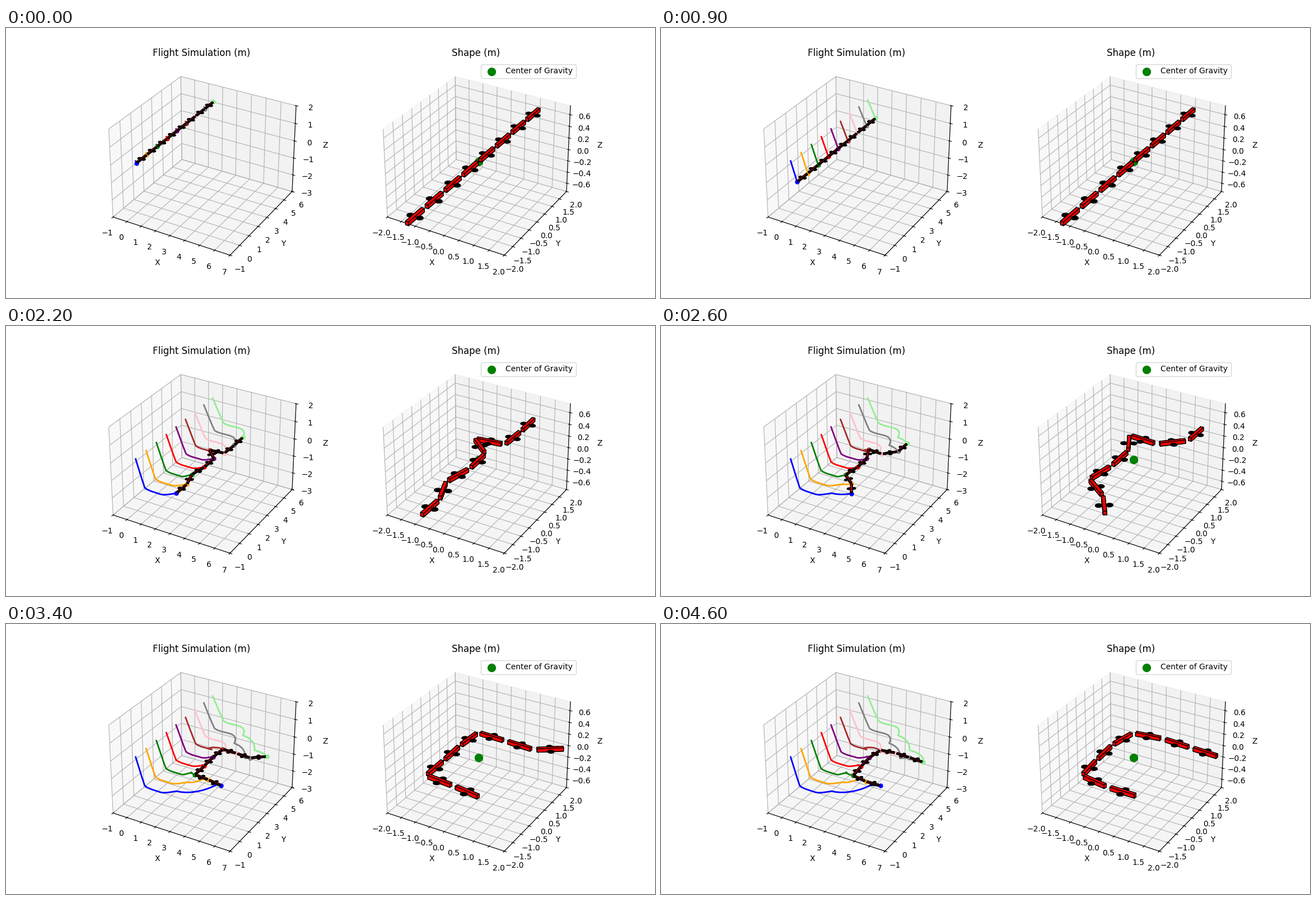
These frames come from a looping animation (1159x483 px, 4.7 s). A matplotlib script:

```python
import numpy as np
import matplotlib.pyplot as plt
from matplotlib.animation import FuncAnimation
from mpl_toolkits.mplot3d.art3d import Poly3DCollection

FRAMES, INTERVAL = 47, 100
LINKS = 8
COLORS = ["blue", "orange", "green", "red", "purple",
          "brown", "pink", "gray", "lightgreen"]

# Flight path of the centre of gravity (time in steps, metres)
X_T = [-1, 9, 13, 14, 15, 17, 18, 22, 30, 37]
X_V = [0, 0.5, 0.7, 0.85, 1.1, 1.6, 1.85, 2.4, 3.0, 3.46]
Z_T = [-1, 9, 13, 14, 15]
Z_V = [0, -1.04, -1.42, -1.47, -1.5]

# Link headings in degrees, measured from +Y towards +X
TURN_T = [18, 22, 30, 37]
TURN_V = np.array([
    [0, 0, 0, 0, 0, 0, 0, 0],
    [0, -20, 12, -2, -50, 82, 2, -2],
    [-69, -90, 6.5, 0, -5.5, 105, 92.5, 4],
    [-90, -80, -6, -4, 10, 82, 94, 94],
])


def headings(t):
    return np.radians([np.interp(t, TURN_T, col) for col in TURN_V.T])


def chain(head):
    """Joint positions of the chain, centred on its centre of gravity."""
    steps = np.column_stack([np.sin(head), np.cos(head), np.zeros(LINKS)])
    nodes = np.vstack([np.zeros(3), np.cumsum(steps, axis=0)])
    return nodes - (nodes[:-1] + nodes[1:]).mean(axis=0) / 2


def flight(t):
    """Headings and joints in the world frame."""
    head = headings(t) + np.interp(t, [-1, 17, 22, 30], [0, 0.04, 0.04, 0])
    nodes = chain(head)
    nodes[:, 2] = nodes[:, 1] * np.interp(t, [-1, 17], [0, 0.025])
    nodes += [np.interp(t, X_T, X_V), 4, np.interp(t, Z_T, Z_V)]
    return head, nodes


def link_parts():
    """Faces of one link: a box and two rotor discs (side, along, up)."""
    s, h, a, b = 0.05, 0.03, 0.1, 0.9
    faces = []
    for x in (-s, s):
        faces.append([(x, a, -h), (x, b, -h), (x, b, h), (x, a, h)])
    for y in (a, b):
        faces.append([(-s, y, -h), (s, y, -h), (s, y, h), (-s, y, h)])
    for z in (-h, h):
        faces.append([(-s, a, z), (s, a, z), (s, b, z), (-s, b, z)])
    ang = np.linspace(0, 2 * np.pi, 20, endpoint=False)
    for x in (-0.15, 0.15):
        faces.append(np.column_stack([x + 0.1 * np.cos(ang),
                                      0.5 + 0.1 * np.sin(ang), 0 * ang]))
    return [np.array(f) for f in faces]


PARTS = link_parts()
PART_COLORS = (["red"] * 6 + ["black"] * 2) * LINKS


def body(head, nodes):
    polys = []
    for h, p, q in zip(head, nodes[:-1], nodes[1:]):
        side = np.array([np.cos(h), -np.sin(h), 0])
        axes = np.array([side, q - p, [0, 0, 1]])
        polys += [p + part @ axes for part in PARTS]
    return polys


def add_body(ax, head, nodes):
    return ax.add_collection3d(Poly3DCollection(
        body(head, nodes), facecolors=PART_COLORS,
        edgecolors="black", linewidths=1))


def setup(ax, title, xlim, ylim, zlim):
    ax.set(title=title, xlabel="X", ylabel="Y", zlabel="Z",
           xlim=xlim, ylim=ylim, zlim=zlim)


fig = plt.figure(figsize=(11.59, 4.83), dpi=100)
sim = fig.add_subplot(121, projection="3d")
shape = fig.add_subplot(122, projection="3d")

paths = np.array([flight(t)[1] for t in range(-1, FRAMES)])
trails = [sim.plot([0], [0], [0], color=c, lw=2, marker="o", ms=5,
                   markevery=[-1])[0] for c in COLORS]
sim_body = add_body(sim, *flight(0))
shape_body = add_body(shape, headings(0), chain(headings(0)))
shape.scatter([0], [0], [0], color="green", s=100, depthshade=False,
              label="Center of Gravity")
shape.legend(loc="upper right")

setup(sim, "Flight Simulation (m)", (-1, 7), (-1, 6), (-3, 2))
setup(shape, "Shape (m)", (-2, 2), (-2, 2), (-0.75, 0.75))


def update(i):
    sim_body.set_verts(body(*flight(i)))
    head = headings(i)
    shape_body.set_verts(body(head, chain(head)))
    for n, trail in enumerate(trails):
        trail.set_data_3d(*paths[:i + 2, n].T)
    return [sim_body, shape_body, *trails]


anim = FuncAnimation(fig, update, frames=FRAMES, interval=INTERVAL,
                     init_func=lambda: update(0), repeat=True,
                     repeat_delay=0, blit=False)
plt.show()
```
